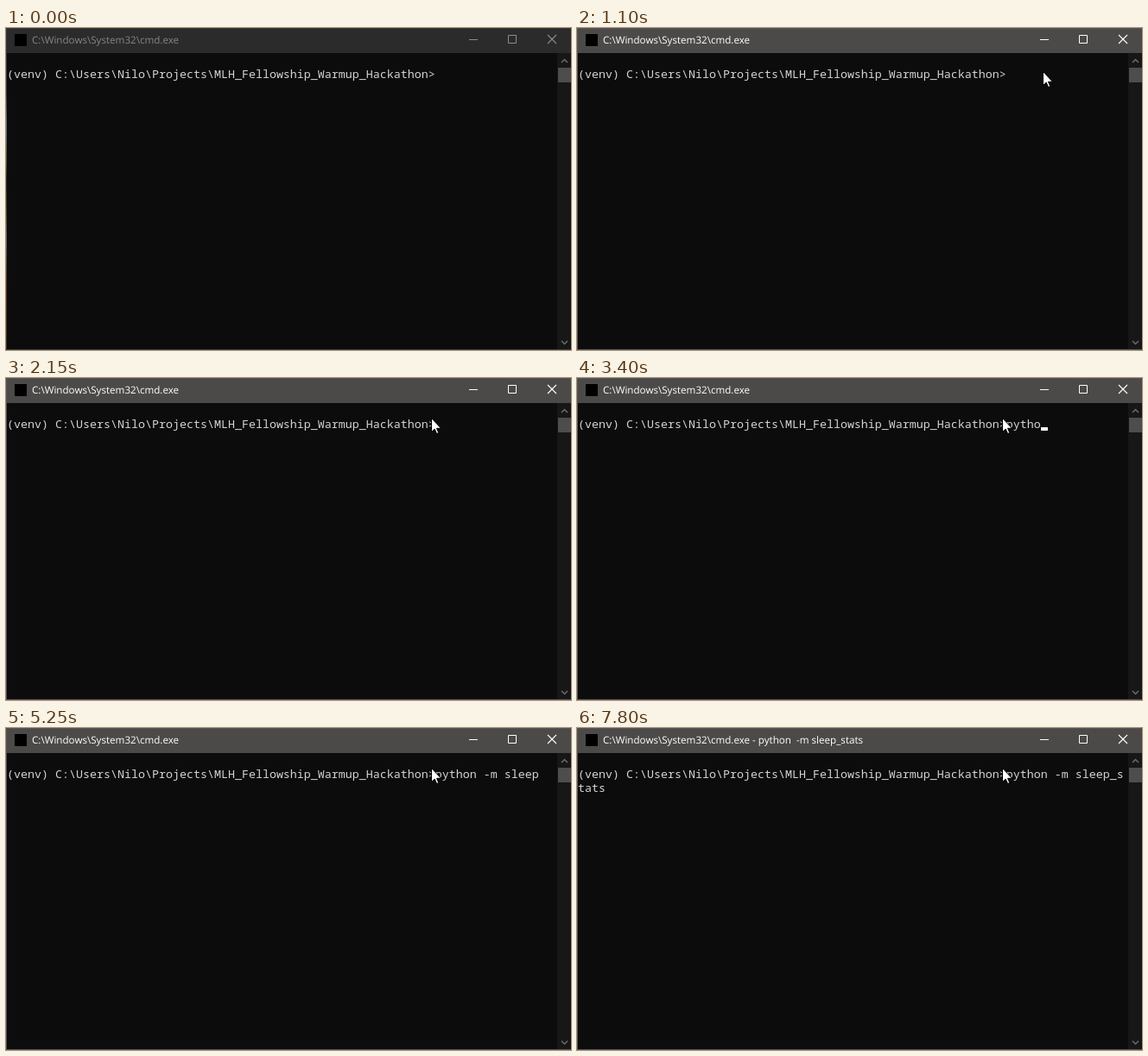
Write an HTML page that moves like this. It is 654x373 px and loops after 8000 ms.

```html
<!DOCTYPE html>
<html lang="en">
<head>
<meta charset="utf-8">
<title>Terminal</title>
<style>
  html, body { margin: 0; width: 100%; height: 100%; overflow: hidden; background: #0c0c0c; }
  svg { display: block; width: 654px; height: 373px; }
  text { white-space: pre; }
  .mono { font: 13.333px "Noto Sans Mono", "DejaVu Sans Mono", monospace; fill: #d4d4d4; }
  .title { font: 11.62px "Open Sans", "Noto Sans", sans-serif; fill: #868686; text-rendering: geometricPrecision; }
  .bar { fill: #2b2b2b; }
  .edge { fill: url(#backdrop); }
  .frame { fill: #3a3a3a; }
  .buttons { fill: none; stroke: #8c8c8c; }
  .active .bar { fill: #4c4a48; }
  .active .title { fill: #fff; }
  .active .edge, .active .frame { fill: #565452; }
  .active .buttons { stroke: #fff; }
</style>
</head>
<body>
<svg id="win" viewBox="0 0 654 373">
  <defs>
    <linearGradient id="backdrop" x2="0" y2="1">
      <stop offset=".2" stop-color="#3a3a3a"/>
      <stop offset=".3" stop-color="#6a7482"/>
      <stop offset=".42" stop-color="#55582c"/>
      <stop offset=".47" stop-color="#3a2429"/>
      <stop offset=".57" stop-color="#4a4e20"/>
      <stop offset=".65" stop-color="#626774"/>
      <stop offset=".8" stop-color="#5a3a20"/>
      <stop offset="1" stop-color="#44302a"/>
    </linearGradient>
  </defs>
  <rect width="654" height="373" fill="#0c0c0c"/>
  <rect class="bar" width="654" height="29"/>
  <rect class="frame" width="654" height="1"/>
  <rect class="frame" y="372" width="654" height="1"/>
  <rect class="edge" width="1" height="373"/>

  <rect x="10" y="7" width="14" height="14" fill="#000"/>
  <text class="title" x="30" y="18">C:\Windows\System32\cmd.exe<tspan id="task"></tspan></text>
  <g class="buttons">
    <path d="M536 13.5h10M581.5 8.5h9v9h-9z"/>
    <path d="M627 8l10 10M637 8l-10 10" stroke-width="1.1"/>
  </g>

  <rect x="638" y="29" width="16" height="343" fill="#171717"/>
  <rect x="639" y="46" width="15" height="17" fill="#4d4d4d"/>
  <path d="M643 40l3.5-3.5 3.5 3.5M643 362.5l3.5 3.5 3.5-3.5" fill="none" stroke="#6b6b6b" stroke-width="1.5"/>

  <text class="mono" x="1" y="58">(venv) C:\Users\Nilo\Projects\MLH_Fellowship_Warmup_Hackathon&gt;<tspan id="row1"></tspan></text>
  <text class="mono" x="1" y="74" id="row2"></text>
  <rect id="caret" width="8" height="4" fill="#f2f2f2"/>
  <path id="mouse" d="M.5.5v16l3.7-3.4 2.4 5.4 2.2-1-2.3-5.2h5z" fill="#fff" stroke="#000"/>
</svg>
<script>
const LOOP = 8000, STEP = 50;
const CELL = 8, COLS = 79, PROMPT = 62, ROOM = COLS - PROMPT;
const FOCUS = 1100, ENTER = 6550, RETITLE = 6600;
const BLINK_START = 1610, BLINK = 515;

// Bursts of typing: text, first key, time between keys
const keys = [
  ['pytho', 2700, 172],
  ['n -m ', 3850, 165],
  ['sleep', 4750, 112],
  ['_sta', 5550, 185],
  ['ts', 6150, 200]
].flatMap(([text, start, pace]) =>
  [...text].map((char, i) => ({ char, time: start + i * pace })));

const el = id => document.getElementById(id);
const [win, task, row1, row2, caret, mouse] =
  ['win', 'task', 'row1', 'row2', 'caret', 'mouse'].map(el);

const progress = (t, start, end) => Math.min(1, Math.max(0, (t - start) / (end - start)));
const easeOut = p => 1 - (1 - p) ** 2;
const bezier = (a, b, c, p) => (1 - p) ** 2 * a + 2 * p * (1 - p) * b + p * p * c;

function pointerAt(t) {
  if (t < 700) return [-40, -40];
  if (t < 1450) {
    const p = easeOut(progress(t, 700, 900));
    return [305 + 234 * p, -8 + 58 * p];
  }
  const p = progress(t, 1450, 1950);
  return [bezier(539, 518, 492, p), bezier(50, 194, 46, p)];
}

// The blink clock runs on; each key press shows the caret until the next tick.
function caretOn(t, shownAt) {
  const ticks = time => Math.floor((time - BLINK_START) / BLINK);
  return t >= BLINK_START && (ticks(t) - ticks(shownAt)) % 2 === 0;
}

function draw(t) {
  const done = keys.filter(key => key.time <= t);
  const text = done.map(key => key.char).join('');
  const entered = t >= ENTER;
  const shownAt = entered ? ENTER : done.length ? done[done.length - 1].time : BLINK_START;
  const cell = entered ? 2 * COLS : PROMPT + text.length;
  const [x, y] = pointerAt(t).map(Math.round);

  win.setAttribute('class', t >= FOCUS ? 'active' : '');
  task.textContent = t >= RETITLE ? ' - python  -m sleep_stats' : '';
  row1.textContent = text.slice(0, ROOM);
  row2.textContent = text.slice(ROOM);
  caret.setAttribute('x', 1 + cell % COLS * CELL);
  caret.setAttribute('y', 57 + Math.floor(cell / COLS) * 16);
  caret.style.display = caretOn(t, shownAt) ? '' : 'none';
  mouse.setAttribute('transform', `translate(${x} ${y})`);
}

const begin = performance.now();
function tick() {
  const t = (performance.now() - begin) % LOOP;
  draw(t - t % STEP);
  requestAnimationFrame(tick);
}
tick();
</script>
</body>
</html>
```
